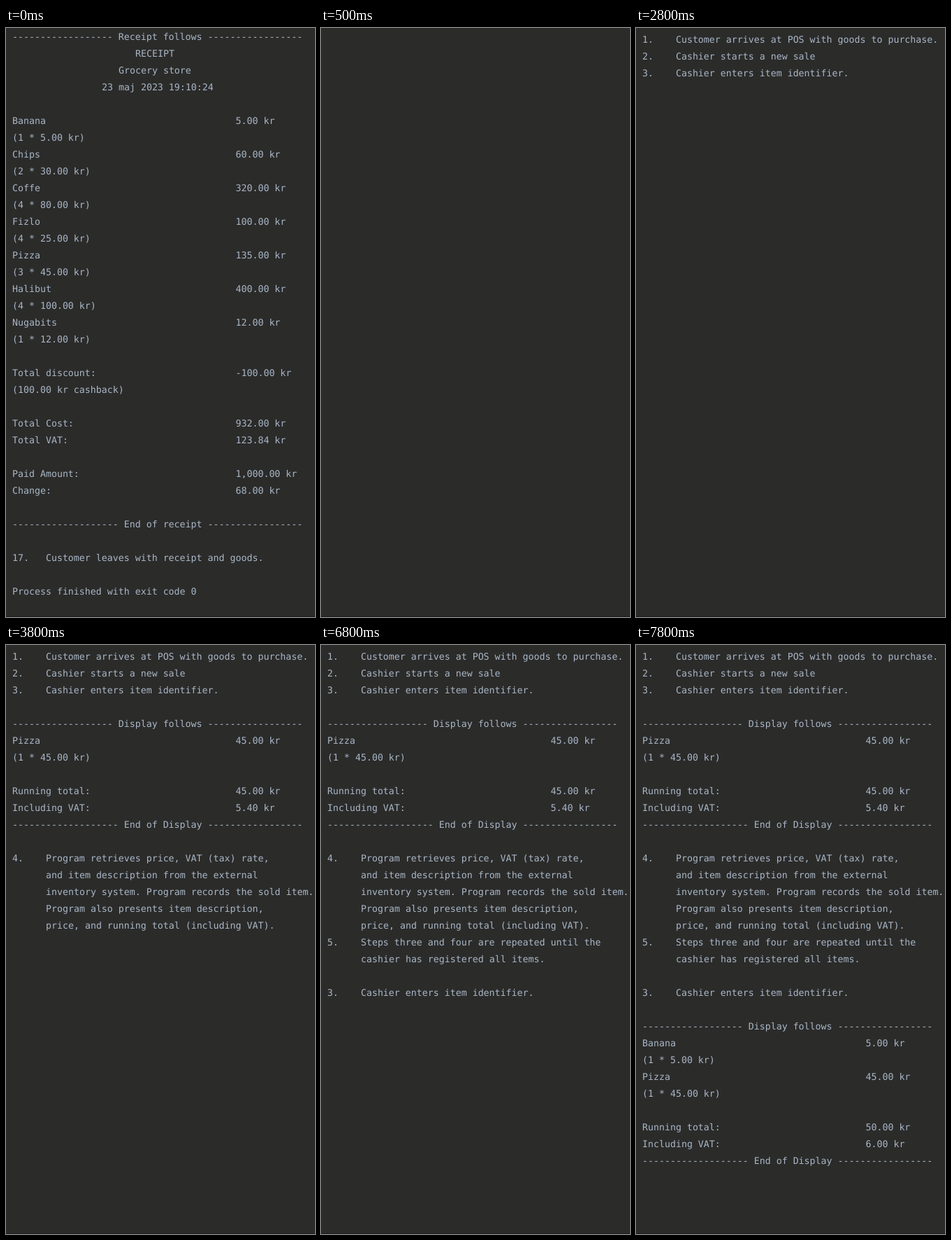
An HTML page that plays this animation: 442 px wide and 841 px high, repeating every 8000 ms.

```html
<!DOCTYPE html>
<html lang="en">
<head>
<meta charset="utf-8">
<title>Point of sale console</title>
<style>
  html, body { margin: 0; width: 100%; height: 100%; overflow: hidden; background: #2b2b2a; }
  svg { display: block; width: 442px; height: 841px; }
  text {
    font-family: "DejaVu Sans Mono", "Noto Sans Mono", monospace;
    font-size: 13.289px;
    fill: #a9b7c6;
    white-space: pre;
    text-rendering: geometricPrecision;
  }
</style>
</head>
<body>
<svg viewBox="0 0 442 841">
  <rect width="442" height="841" fill="#2b2b2a"/>
  <g id="receipt"></g>
  <g id="console"></g>
  <rect y="840" width="442" height="1" fill="#1c1c1c"/>
</svg>
<script>
const LOOP = 8000, CLEAR_AT = 500, LEFT = 9, LINE = 24;
const SVG = "http://www.w3.org/2000/svg";

const row = (label, value) => label.padEnd(40) + value;
const rule = (title, left) => `${"-".repeat(left)} ${title} ${"-".repeat(17)}`;
const center = (text, column) => " ".repeat(column) + text;
const item = (name, total, count, price) =>
  [row(name, `${total} kr`), `(${count} * ${price} kr)`];
const step = (number, ...lines) =>
  lines.map((line, i) => (i ? "" : `${number}.`).padEnd(6) + line);
const display = (items, total, vat) => [
  "",
  rule("Display follows", 18),
  ...items,
  "",
  row("Running total:", `${total} kr`),
  row("Including VAT:", `${vat} kr`),
  rule("End of Display", 19),
];

const receipt = [
  rule("Receipt follows", 18),
  center("RECEIPT", 22),
  center("Grocery store", 19),
  center("23 maj 2023 19:10:24", 16),
  "",
  ...item("Banana", "5.00", 1, "5.00"),
  ...item("Chips", "60.00", 2, "30.00"),
  ...item("Coffe", "320.00", 4, "80.00"),
  ...item("Fizlo", "100.00", 4, "25.00"),
  ...item("Pizza", "135.00", 3, "45.00"),
  ...item("Halibut", "400.00", 4, "100.00"),
  ...item("Nugabits", "12.00", 1, "12.00"),
  "",
  row("Total discount:", "-100.00 kr"),
  "(100.00 kr cashback)",
  "",
  row("Total Cost:", "932.00 kr"),
  row("Total VAT:", "123.84 kr"),
  "",
  row("Paid Amount:", "1,000.00 kr"),
  row("Change:", "68.00 kr"),
  "",
  rule("End of receipt", 19),
  "",
  ...step(17, "Customer leaves with receipt and goods."),
  "",
  "Process finished with exit code 0",
];

const pizza = item("Pizza", "45.00", 1, "45.00");
const output = [
  { at: 700, lines: step(1, "Customer arrives at POS with goods to purchase.") },
  { at: 1700, lines: step(2, "Cashier starts a new sale") },
  { at: 2800, lines: step(3, "Cashier enters item identifier.") },
  { at: 3800, lines: [
    ...display(pizza, "45.00", "5.40"),
    "",
    ...step(4,
      "Program retrieves price, VAT (tax) rate,",
      "and item description from the external",
      "inventory system. Program records the sold item.",
      "Program also presents item description,",
      "price, and running total (including VAT)."),
  ] },
  { at: 4800, lines: step(5,
    "Steps three and four are repeated until the",
    "cashier has registered all items.") },
  { at: 6800, lines: ["", ...step(3, "Cashier enters item identifier.")] },
  { at: 7800, lines: display(
    [...item("Banana", "5.00", 1, "5.00"), ...pizza], "50.00", "6.00") },
];

function print(parent, lines, baseline) {
  const group = parent.appendChild(document.createElementNS(SVG, "g"));
  lines.forEach((line, i) => {
    if (!line) return;
    const indent = line.length - line.trimStart().length;
    const text = group.appendChild(document.createElementNS(SVG, "text"));
    text.setAttribute("x", LEFT + indent * 8);
    text.setAttribute("y", baseline + i * LINE);
    text.textContent = line.trimStart();
  });
  return group;
}

const receiptGroup = print(document.getElementById("receipt"), receipt, 17);
const consoleRoot = document.getElementById("console");
let baseline = 21;
for (const block of output) {
  block.group = print(consoleRoot, block.lines, baseline);
  baseline += block.lines.length * LINE;
}

function show(group, visible) {
  group.setAttribute("visibility", visible ? "visible" : "hidden");
}

function render(time) {
  show(receiptGroup, time < CLEAR_AT);
  for (const { at, group } of output) show(group, time >= at);
}

const start = performance.now();
function tick(now) {
  render(Math.max(0, now - start) % LOOP);
  requestAnimationFrame(tick);
}
render(0);
requestAnimationFrame(tick);
</script>
</body>
</html>
```
